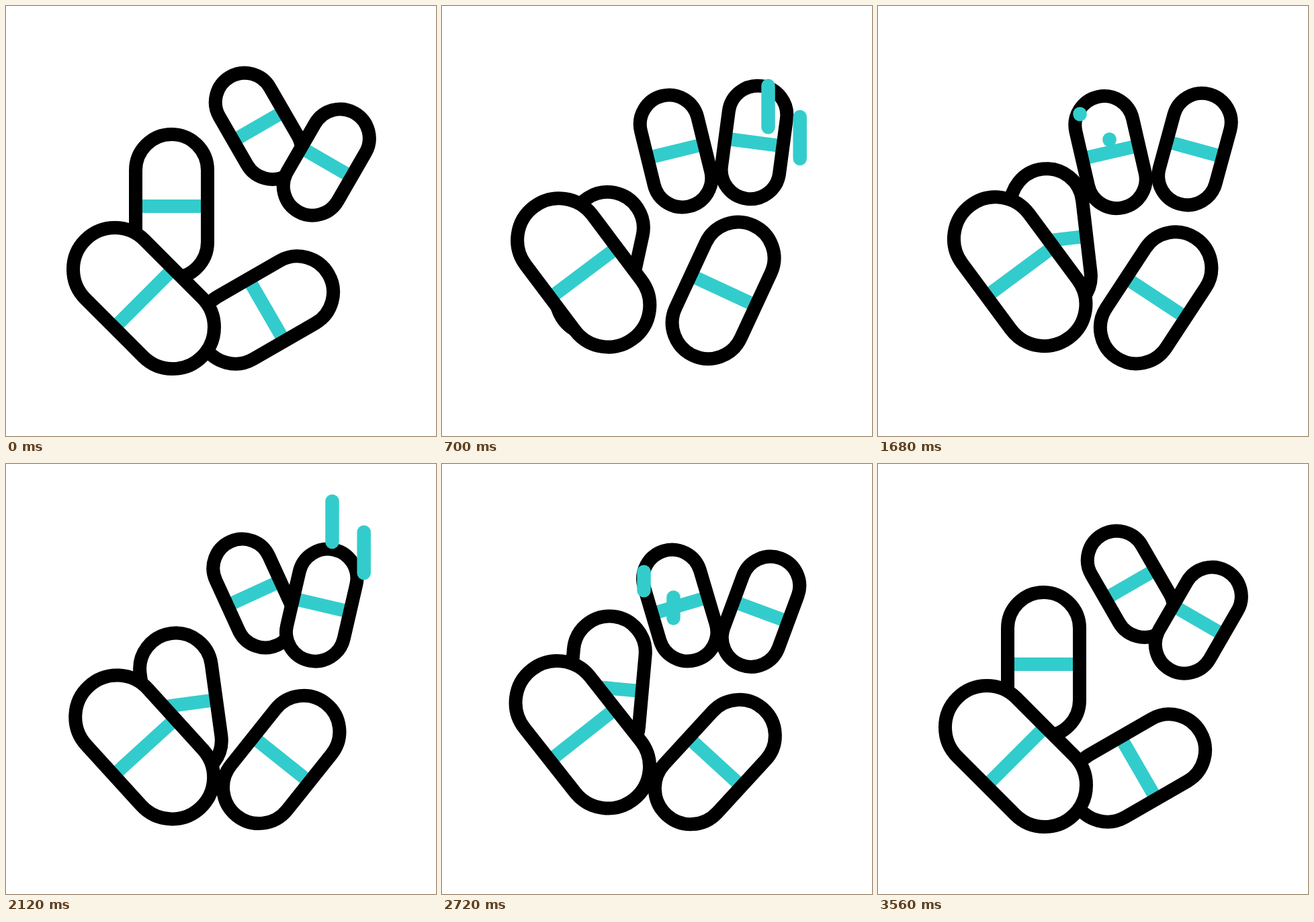
An HTML page for the animation above (3600 ms loop, 640 px wide and 640 px high).

```html
<!DOCTYPE html>
<html lang="en">
<head>
<meta charset="utf-8">
<title>Pills</title>
<style>
  html, body { margin: 0; width: 100%; height: 100%; overflow: hidden; background: #fff; }
  svg { display: block; width: 100vw; height: 100vh; }
  .shell { fill: #fff; stroke: none; }
  .rim { fill: none; stroke: #000; stroke-width: 20; }
  .band { fill: #3cc; }
  .dash { stroke: #3cc; stroke-width: 20.5; stroke-linecap: round; }
</style>
</head>
<body>
<svg id="stage" viewBox="0 0 640 640"></svg>
<script>
const LOOP = 3600;
const stage = document.getElementById('stage');

// Rest and peak times of the three bounces.
const early = [0, 590, 1175, 1758, 2330, 2908, 3515];
const mid = [0, 640, 1295, 1874, 2440, 3015, 3560];
const late = [0, 640, 1295, 1943, 2475, 3025, 3560];
const last = [0, 650, 1328, 1936, 2482, 3025, 3560];

// r: radius, h: half length, at: x, y, angle at rest.
// go: shift at progress k = [x*k, x*k², y*k, y*k², angle*k]; alt: the same for the second bounce.
const pills = [
  { r: 43.4, h: 41.2, at: [375.8, 178.8, -30], keys: early, go: [-18.8, -13.1, 47.4, -7, 17.9] },
  { r: 43.4, h: 41.2, at: [476.8, 232.6, 30], keys: late, go: [0, -13, -30.4, 0, -23] },
  { r: 53.5, h: 53.5, at: [246.5, 298, 0], keys: last, go: [0, -12, 86, 0, 12.5], alt: [11, 10, 82, 0, -10.7] },
  { r: 53.5, h: 53.2, at: [387.5, 452.5, 60], keys: mid, go: [46, -14.5, -7.6, -22.8, -36] },
  { r: 62, h: 60.8, at: [205, 435, -45], keys: early, go: [2.7, 4, -46.3, 4.75, 8.9] }
];

// Each dash grows upward from y0 to y1, then its tail follows.
const HALF = 284;
const dashes = [
  { x: 300.5, y0: 260, y1: 160.5, starts: [1128, 2252] },
  { x: 344.5, y0: 309, y1: 198.5, starts: [1128, 2252] },
  { x: 485.5, y0: 180.5, y1: 55.5, starts: [560, 1692] },
  { x: 532.7, y0: 227, y1: 101.5, starts: [560, 1692] }
];

function add(parent, tag, attrs) {
  const el = document.createElementNS('http://www.w3.org/2000/svg', tag);
  for (const name in attrs) el.setAttribute(name, attrs[name]);
  return parent.appendChild(el);
}

function ease(x) {
  x = Math.min(1, Math.max(0, x));
  return x * x * (3 - 2 * x);
}

for (const p of pills) {
  const { r, h } = p;
  const box = { x: -r, y: -h - r, width: 2 * r, height: 2 * (h + r), rx: r };
  p.el = add(stage, 'g', {});
  add(p.el, 'rect', { class: 'shell', ...box });
  add(p.el, 'rect', { class: 'band', x: -r, y: -10, width: 2 * r, height: 20 });
  add(p.el, 'rect', { class: 'rim', ...box });
}
for (const d of dashes) d.el = add(stage, 'line', { class: 'dash', x1: d.x, x2: d.x });

function posePill(p, t) {
  const { keys, at } = p;
  let i = 0;
  while (i < 5 && t >= keys[i + 1]) i++;
  const e = ease((t - keys[i]) / (keys[i + 1] - keys[i]));
  const k = i % 2 ? 1 - e : e;
  const g = p.alt && i >> 1 === 1 ? p.alt : p.go;
  const x = at[0] + g[0] * k + g[1] * k * k;
  const y = at[1] + g[2] * k + g[3] * k * k;
  p.el.setAttribute('transform', `translate(${x} ${y}) rotate(${at[2] + g[4] * k})`);
}

function poseDash(d, t) {
  const start = d.starts.find(s => t > s && t < s + 2 * HALF);
  d.el.style.display = start === undefined ? 'none' : '';
  if (start === undefined) return;
  const u = (t - start) / HALF;
  const place = f => d.y0 + (d.y1 - d.y0) * f;
  d.el.setAttribute('y1', place(ease(u - 1)));
  d.el.setAttribute('y2', place(ease(u)) - 0.01);
}

function draw(t) {
  for (const p of pills) posePill(p, t);
  for (const d of dashes) poseDash(d, t);
}

const begin = performance.now();
function tick() {
  draw((performance.now() - begin) % LOOP);
  requestAnimationFrame(tick);
}
draw(0);
requestAnimationFrame(tick);
</script>
</body>
</html>
```
